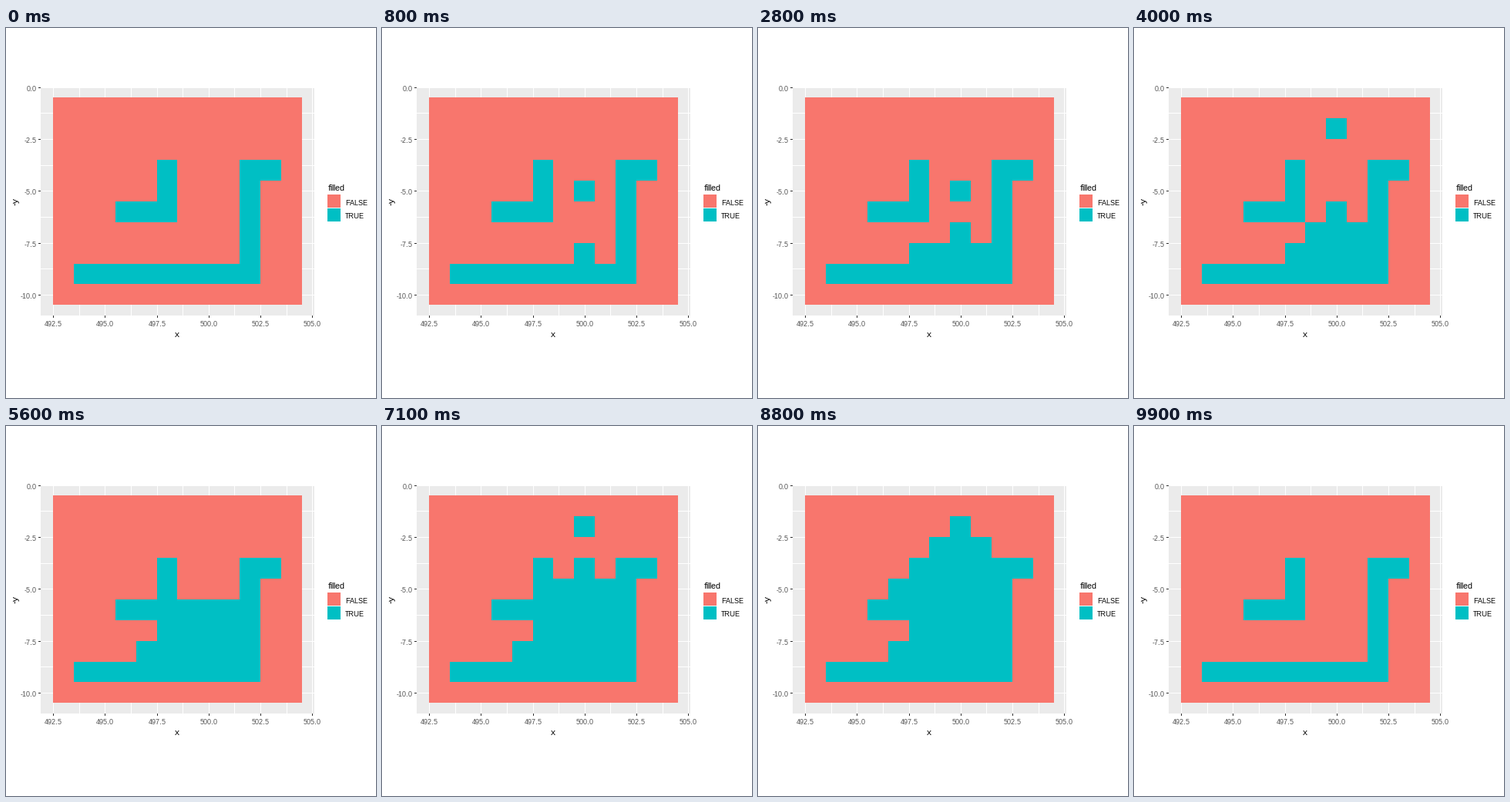
A matplotlib script that plays this animation: 480 px wide and 480 px high, repeating every 10000 ms.

```python
import numpy as np
import matplotlib.pyplot as plt
from matplotlib.animation import FuncAnimation
from matplotlib.colors import ListedColormap
from matplotlib.patches import Rectangle

SIZE, DPI = 480, 72          # one point equals one pixel
FRAMES, INTERVAL = 100, 100
UNIT, LEFT, TOP = 26.92, 61.44, 90.7
X_MIN, COLS, ROWS = 493, 12, 10
RED, TEAL = "#F8766D", "#00BFC4"

plt.rcParams.update({
    "font.family": "Liberation Sans",
    "text.hinting": "native",
    "text.hinting_factor": 1,
})


def px(x):
    return int(LEFT + (x - 492.5) * UNIT)


def py(y):
    return int(TOP + (y - 0.5) * UNIT)


def rock_grid():
    """Walls indexed as [depth, column]; depth 0 is the hidden source row."""
    grid = np.zeros((ROWS + 1, COLS), bool)
    for x0, y0, x1, y1 in [(498, 4, 498, 6), (496, 6, 498, 6),
                           (502, 4, 503, 4), (502, 4, 502, 9),
                           (494, 9, 502, 9)]:
        grid[y0:y1 + 1, x0 - X_MIN:x1 - X_MIN + 1] = True
    return grid


def pour():
    """List every step of the falling sand until a grain slips off the edge."""
    grid, states = rock_grid(), []
    while True:
        x, y = 500 - X_MIN, 0
        while True:
            shot = grid.copy()
            shot[y, x] = True
            states.append(shot[1:])
            if y == 9:
                return states
            step = next((d for d in (0, -1, 1) if not grid[y + 1, x + d]), None)
            if step is None:
                grid[y, x] = True
                break
            x, y = x + step, y + 1


fig = plt.figure(figsize=(SIZE / DPI, SIZE / DPI), dpi=DPI, facecolor="white")
ax = fig.add_axes([0, 0, 1, 1])
ax.set_xlim(0, SIZE)
ax.set_ylim(SIZE, 0)
ax.axis("off")


def box(x0, y0, x1, y1, color):
    ax.add_patch(Rectangle((x0, y0), x1 - x0, y1 - y0, facecolor=color,
                           linewidth=0, antialiased=False, zorder=1))


def label(x, y, text, size=9, color="black", ha="left", **kw):
    ax.text(x, y, text, fontsize=size, color=color, ha=ha, va="baseline", **kw)


# Panel, grid lines and axes
L, T, R, B = 45, 77, 400, 373
box(L, T, R, B, "#EBEBEB")
for x in np.arange(492.5, 505.1, 1.25):
    box(px(x), T, px(x) + 1, B, "white")
for y in np.arange(0, 10.1, 1.25):
    box(L, py(y), R, py(y) + 1, "white")

for x in np.arange(492.5, 505.1, 2.5):
    box(px(x), B, px(x) + 1, B + 3, "#333333")
    label(px(x) + 0.5, 387, f"{x:.1f}", color="#4D4D4D", ha="center")
for y in np.arange(0, 10.1, 2.5):
    box(L - 3, py(y), L, py(y) + 1, "#333333")
    label(40, py(y) + 5, f"{0 - y:.1f}", color="#4D4D4D", ha="right")

label(222, 401, "x", 11, ha="center")
label(15, 225, "-y", 11, ha="center", rotation=90, rotation_mode="anchor")

# Legend
label(418, 211, "filled", 11)
box(417, 216, 434, 233, RED)
box(417, 234, 434, 251, TEAL)
label(440, 230, "FALSE")
label(440, 247, "TRUE")

# Tiles
rocks = rock_grid()[1:]
states = pour()
tiles = ax.pcolormesh([px(492.5 + i) for i in range(COLS + 1)],
                      [py(0.5 + j) for j in range(ROWS + 1)],
                      rocks.astype(float), cmap=ListedColormap([RED, TEAL]),
                      vmin=0, vmax=1, antialiased=False, zorder=2)


def draw(frame):
    step = (90 + 172 * frame) // 100
    grid = states[step] if step < len(states) else rocks
    tiles.set_array(grid.astype(float))
    return [tiles]


anim = FuncAnimation(fig, draw, frames=FRAMES, interval=INTERVAL,
                     repeat=True, repeat_delay=0, blit=False)
plt.show()
```
